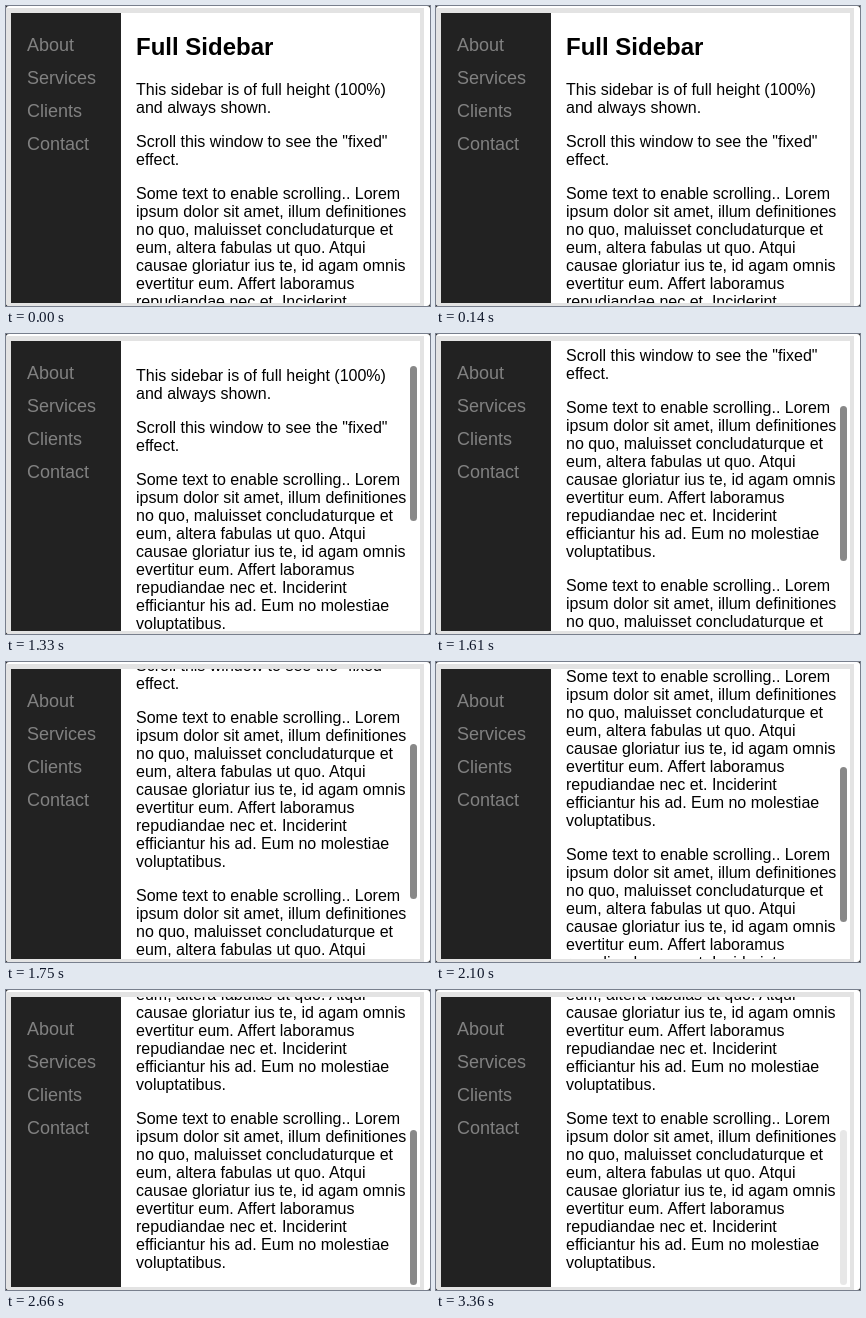
Write an HTML page that moves like this. It is 424 px wide and 300 px high and loops after 3.43 s.

```html
<!DOCTYPE html>
<html lang="en">
<head>
<meta charset="utf-8">
<title>Full Sidebar</title>
<style>
  html, body { margin: 0; width: 100%; height: 100%; overflow: hidden; background: #222; }
  body { font: 16px/18px "Liberation Sans", Arial, sans-serif; color: #000; }
  #stage { position: relative; width: 424px; height: 300px; overflow: hidden; background: #fff; border-radius: 3px; }
  #frame { position: absolute; left: 0; top: 2px; width: 418px; height: 298px; background: #e3e3e3; }
  #view { position: absolute; left: 5px; top: 7px; width: 409px; height: 290px; overflow: hidden; background: #fff; }
  #page { position: absolute; left: 125px; top: 20px; white-space: pre; }
  h2 { margin: 0 0 20px; font-size: 24px; line-height: 28px; }
  p { margin: 0 0 16px; }
  nav { position: absolute; left: 0; top: 0; width: 94px; height: 100%; padding: 16px 0 0 16px;
        box-sizing: content-box; background: #222; color: #818181; font-size: 18px; line-height: 33px; }
  nav div { height: 33px; }
  #thumb { position: absolute; left: 404px; top: 0; width: 7px; height: 155px; border-radius: 4px; background: #888; }
</style>
</head>
<body>
<div id="stage">
  <div id="frame"></div>
  <div id="view">
    <div id="page"></div>
    <nav><div>About</div><div>Services</div><div>Clients</div><div>Contact</div></nav>
  </div>
  <div id="thumb"></div>
</div>
<script>
const page = document.getElementById("page");
const thumb = document.getElementById("thumb");

const filler = `Some text to enable scrolling.. Lorem
ipsum dolor sit amet, illum definitiones
no quo, maluisset concludaturque et
eum, altera fabulas ut quo. Atqui
causae gloriatur ius te, id agam omnis
evertitur eum. Affert laboramus
repudiandae nec et. Inciderint
efficiantur his ad. Eum no molestiae
voluptatibus.`;
const paragraphs = [
  "This sidebar is of full height (100%)\nand always shown.",
  'Scroll this window to see the "fixed"\neffect.',
  filler,
  filler
];
page.innerHTML = "<h2>Full Sidebar</h2>" + paragraphs.map(text => `<p>${text}</p>`).join("");

const LOOP = 3430, STEP = 70;

// Scroll offsets of each flick, one per step from its start time
const flicks = [
  { start: 1050, offsets: [10, 14, 21, 30, 42, 58, 77, 97, 114, 126, 132] },
  { start: 2030, offsets: [150, 173, 190, 199] },
  { start: 2590, offsets: [222, 237] }
];

function scrollAt(time) {
  const flick = flicks.filter(({ start }) => time >= start).pop();
  if (!flick) return 0;
  const index = Math.floor((time - flick.start) / STEP);
  return flick.offsets[Math.min(index, flick.offsets.length - 1)];
}

function thumbOpacity(time) {
  if (time < 1050) return 0;
  if (time < 3290) return 1;
  return time < 3360 ? 0.6 : 0.2;
}

function draw(now) {
  const time = now % LOOP;
  const scroll = scrollAt(time);
  page.style.transform = `translateY(${-scroll}px)`;
  thumb.style.transform = `translateY(${Math.round(8.7 + scroll * 0.554)}px)`;
  thumb.style.opacity = thumbOpacity(time);
}

const begin = performance.now();
function tick() {
  draw(performance.now() - begin);
  requestAnimationFrame(tick);
}
tick();
</script>
</body>
</html>
```
